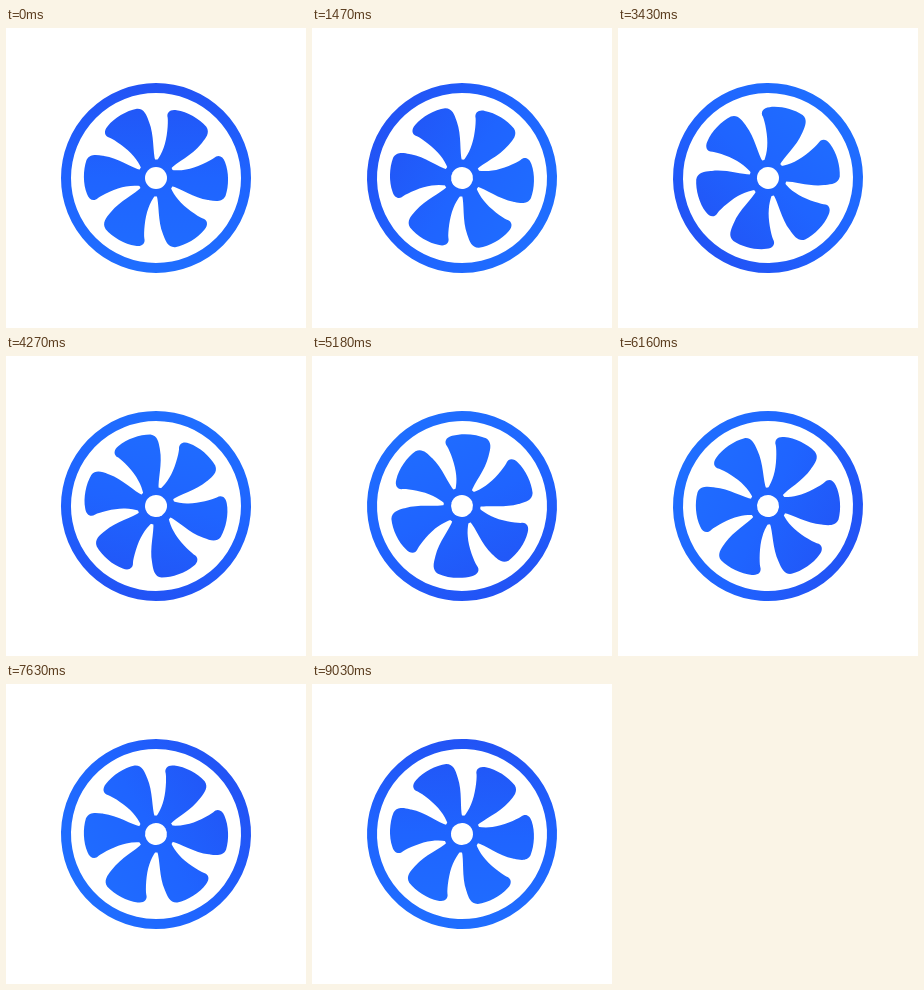
Animation, 300 px wide and 300 px high, one loop 9100 ms. Source, as an HTML page:

```html
<!DOCTYPE html>
<html lang="en">
<head>
<meta charset="utf-8">
<title>Fan</title>
<style>
  html, body { margin: 0; width: 100%; height: 100%; overflow: hidden; background: #fff; }
  svg { display: block; width: 100vw; height: 100vh; }
</style>
</head>
<body>
<svg viewBox="0 0 300 300">
  <defs>
    <linearGradient id="blue" gradientUnits="userSpaceOnUse" x1="0" y1="-95" x2="0" y2="95">
      <stop offset="0" stop-color="#2253f5"/>
      <stop offset=".5" stop-color="#1f64ff"/>
      <stop offset="1" stop-color="#1f6eff"/>
    </linearGradient>
    <clipPath id="blades"></clipPath>
  </defs>
  <g transform="translate(150 150)">
    <g id="fan">
      <circle r="90" fill="#fff" stroke="url(#blue)" stroke-width="10"/>
      <circle r="80" fill="url(#blue)" clip-path="url(#blades)"/>
      <circle r="18.5" fill="url(#blue)"/>
      <circle r="11" fill="#fff"/>
    </g>
  </g>
</svg>
<script>
  const LOOP = 9100, STEP = 70, BLADES = 6;
  const BLADE = 'M8,-15 C10,-24 20,-38 22,-52 C23,-58 25,-66 18,-69.5 ' +
    'C8,-73 -6,-73 -16,-69 C-22,-67 -24,-62 -20,-58 ' +
    'C-17,-54 -10,-40 -8.5,-30 C-7.5,-25 -7.5,-20 -8,-15 Z';

  const fan = document.getElementById('fan');
  const blades = document.getElementById('blades');
  for (let i = 0; i < BLADES; i++) {
    const blade = document.createElementNS('http://www.w3.org/2000/svg', 'path');
    blade.setAttribute('d', BLADE);
    blade.setAttribute('transform', `rotate(${30 + i * 360 / BLADES})`);
    blades.append(blade);
  }

  // One counter-clockwise turn per loop, advanced in fixed steps.
  function draw(ms) {
    const t = Math.floor((ms % LOOP) / STEP) * STEP;
    fan.setAttribute('transform', `rotate(${-360 * t / LOOP})`);
  }

  const start = performance.now();
  function tick() {
    draw(performance.now() - start);
    requestAnimationFrame(tick);
  }
  draw(0);
  requestAnimationFrame(tick);
</script>
</body>
</html>
```
